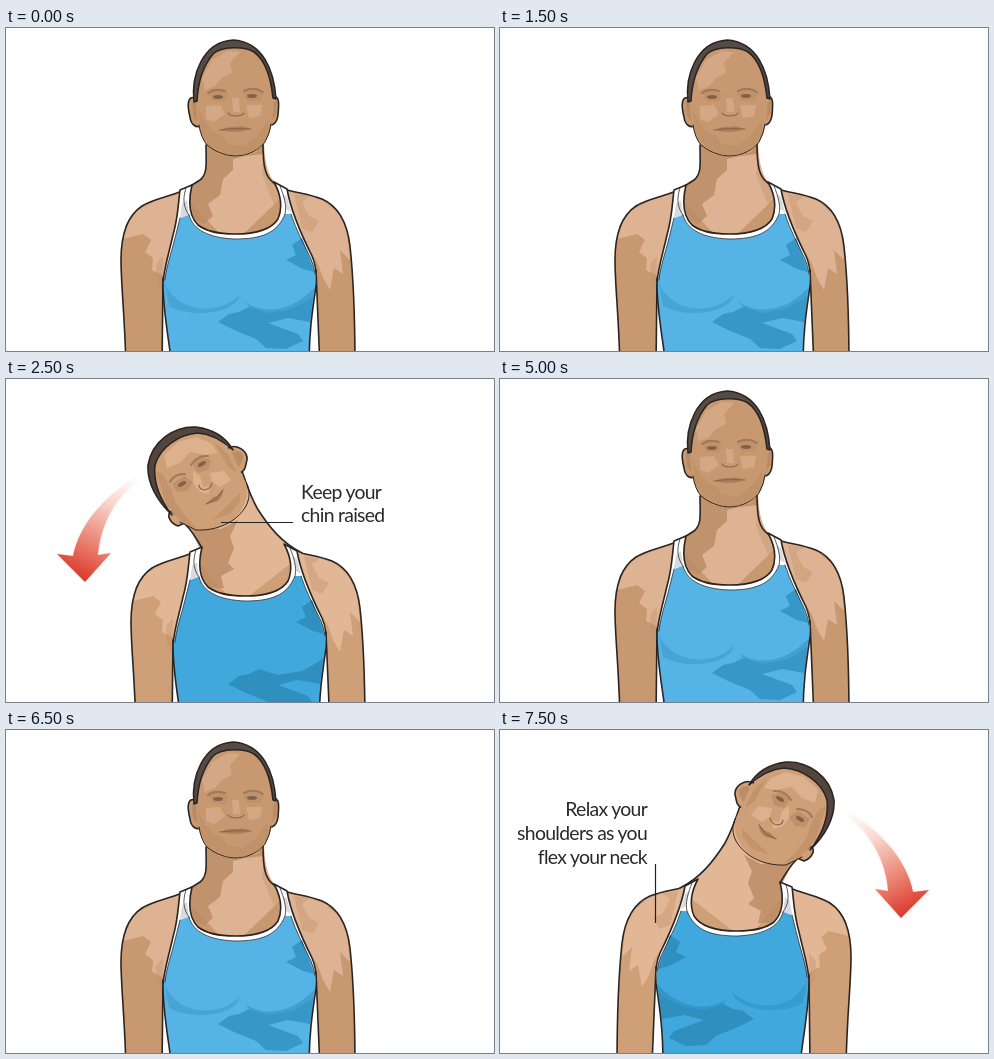
Recreate the animation shown at these times as an HTML page. Size 488 by 323 pixels, loop 10000 ms.

```html
<!DOCTYPE html>
<html lang="en">
<head>
<meta charset="utf-8">
<title>Neck stretch</title>
<style>
html, body { margin: 0; width: 100%; height: 100%; overflow: hidden; background: #fff; }
svg { display: block; width: 488px; height: 323px; }
.pose { --skin: #cf9f77; --shade: #bd8d65; --lit: #e2b796; --hair: #54443e; --top: #40a8dc; --fold: #2f90bf; --crease: #3398c9; }
.upright { --skin: #c89971; --shade: #b98b64; --lit: #deb393; --hair: #564a46; --top: #56b3e5; --fold: #3797c9; --crease: #449fd1; }
.left { --crease: var(--top); }
.skin { fill: var(--skin); }
.shade { fill: var(--shade); }
.lit { fill: var(--lit); }
.hair { fill: var(--hair); }
.top { fill: var(--top); }
.fold { fill: var(--fold); }
.crease { fill: var(--crease); }
.ink { stroke: #2b2522; stroke-width: 1.6; stroke-linejoin: round; stroke-linecap: round; }
.line { fill: none; }
.thin { stroke-width: 1; }
.fine { fill: none; stroke: #8a6549; stroke-width: 1.2; stroke-linecap: round; }
.brow { fill: none; stroke: #a0785a; stroke-width: 2; stroke-linecap: round; }
.eye { fill: #80614b; }
.lip { fill: #b17d5f; }
.pointer { stroke: #222; stroke-width: 1.2; }
text { font: 400 19.4px Lato, "Open Sans", sans-serif; letter-spacing: -.7px; fill: #2a2a2a; }
.upright { animation: upright 10s step-end infinite; }
.left { opacity: 0; animation: left 10s step-end infinite; }
.right { opacity: 0; animation: right 10s step-end infinite; }
@keyframes upright { 0%, 50% { opacity: 1; } 25%, 75%, 100% { opacity: 0; } }
@keyframes left { 0%, 50%, 100% { opacity: 0; } 25% { opacity: 1; } }
@keyframes right { 0% { opacity: 0; } 75%, 100% { opacity: 1; } }
</style>
</head>
<body>
<svg viewBox="0 0 488 323">
<defs>
  <linearGradient id="glow" gradientUnits="userSpaceOnUse" x1="130" y1="98" x2="76" y2="200">
    <stop offset="0" stop-color="#fff"/>
    <stop offset=".3" stop-color="#f9d6cd"/>
    <stop offset=".65" stop-color="#ec8b7a"/>
    <stop offset="1" stop-color="#dc3a2c"/>
  </linearGradient>
  <filter id="soft" x="-20%" y="-20%" width="140%" height="140%"><feGaussianBlur stdDeviation="1.5"/></filter>

  <g id="arrow">
    <path id="dart" d="M134 98C102 113 74 143 67 177L51 175L79 203L105 174L92 176C94 147 108 120 134 98Z" fill="#bb8b87" opacity=".25" filter="url(#soft)"/>
    <path d="M134 98C102 113 74 143 67 177L51 175L79 203L105 174L92 176C94 147 108 120 134 98Z" fill="url(#glow)"/>
  </g>

  <g id="arms">
    <path class="skin" d="M176 163C162 169 147 171 136 178C121 188 115 206 115 232C115 258 119 290 120 340H156L157 258L200 220H260L310 250L314 340H349C349 300 348 255 344 218C341 193 332 178 316 171C304 166 292 165 281 162L228 150Z"/>
    <path class="lit" d="M176 164L151 172L132 182L120 196L117 211L137 206L145 212L139 224L147 230L146 242L158 248L172 212L190 190Z"/>
    <path class="lit" d="M270 160L300 167L318 173L333 186L341 204L344 232L334 222L337 246L328 240L324 262L317 250L312 236L296 208Z"/>
    <path class="shade" d="M288 166L304 168L296 174L303 188L313 193L306 204L296 200ZM150 236L157 228L156 262L151 254Z" opacity=".35"/>
    <path class="ink line" d="M176 163C162 169 147 171 136 178C121 188 115 206 115 232C115 258 119 290 120 340M281 162C292 165 304 166 316 171C332 178 341 193 344 218C348 255 349 300 349 340M157 250L156 340M310 242L314 340"/>
  </g>

  <g id="shirt">
    <path fill="#fff" d="M174 162L186 157C182 174 183 188 192 197C201 204 215 206 229 206C250 206 265 202 272 191C277 179 274 165 268 154L281 161C285 184 295 206 306 228C310 237 311 245 310 258L300 270H165L157 255C158 240 163 225 167 207C172 190 172 178 174 162Z"/>
    <path fill="#d9dadd" d="M176 176L181 172L183 188L174 189ZM277 166L281 169L285 184L280 181Z"/>
    <path class="top" d="M174 190L183 187C187 202 203 210 229 211C254 211 271 206 279 186L285 186C290 202 298 216 305 231C309 240 310 250 309 262C306 285 303 305 303 340H166C163 310 158 285 157 258C160 240 165 226 169 210Z"/>
    <path class="fold" d="M296 210L302 226L308 244L297 241L280 232L290 227L286 217Z"/>
    <path class="crease" d="M158 252C164 272 184 283 208 280C222 277 230 271 234 266C232 284 190 292 163 278Z" opacity=".7"/>
    <path class="crease" d="M238 273C254 286 284 286 308 260L305 290L270 289L248 284Z"/>
    <path class="fold" d="M212 294L223 286L233 284L243 279L262 285L286 281L302 272L307 268L304 294L282 290L262 295L292 306L297 313L280 321L260 320L250 311L228 302Z"/>
    <path class="ink line thin" d="M183 187C187 202 203 210 229 211C254 211 271 206 279 186C281 178 278 168 274 158M180 160C176 172 178 180 183 187M174 190L169 210C165 226 160 240 159 252M285 186C290 202 298 216 305 231Q308 238 309 246" opacity=".75"/>
    <path class="ink line" d="M166 340C163 310 157 285 157 255C158 240 163 225 167 207C172 190 172 178 174 162L186 157C182 174 183 188 192 197C201 204 215 206 229 206C250 206 265 202 272 191C277 179 274 165 268 154L281 161C285 184 295 206 306 228C310 237 311 245 310 258C306 285 303 305 303 340"/>
  </g>

  <g id="tilted">
    <use href="#arms" x="10" y="11"/>
    <path class="lit" d="M178 143C187 152 193 163 197 169L186 174L230 227L297 175C276 164 263 148 251 129C244 116 240 104 236 92Z"/>
    <path class="shade" d="M182 146L215 150L232 141L224 157L228 169L222 184L228 190L215 197L218 209L203 209L194 198L195 172Z" opacity=".85"/>
    <path class="ink line" d="M179 145C187 153 192 162 196 169M236 92C240 104 244 116 251 129C263 148 276 164 296 174"/>
    <path class="skin ink" d="M222 69C232 64 242 73 241 81C239 88 240 91 234 94L225 90Z"/>
    <path class="shade" d="M226 73Q238 70 237 81L232 89L229 81Z"/>
    <path class="skin ink" d="M165 132C160 136 164 144 172 147L181 143Z"/>
    <path class="skin" d="M147 92C148 68 170 52 193 52C210 54 223 67 228 79L237 98C245 111 241 123 233 134C222 147 206 152 191 151C178 146 170 137 163 130C153 118 147 104 147 90Z"/>
    <path class="ink line thin" d="M174 143L190 151C210 152 230 144 240 127C244 119 244 112 241 105"/>
    <path class="hair ink" d="M166 136C151 122 141 104 142 86C146 62 168 47 190 48C206 50 219 57 227 71C217 62 206 55 192 54C174 55 154 68 149 86C147 104 155 122 166 136Z"/>
    <path class="lit" d="M158 76L172 63L190 58L205 64L212 74L200 76L184 73L174 84L161 89ZM187 92L194 97L197 108L204 107L203 115L194 113L187 104ZM204 94L218 92L225 101L214 108L206 103Z" opacity=".75"/>
    <path class="shade" d="M150 93L157 95L166 112L169 123L181 139L192 150L178 145L161 127ZM209 64L222 75L231 94L222 88ZM222 126L234 114L234 122L224 135L206 141Z" opacity=".6"/>
    <path class="shade" d="M166 105L178 97L187 103L181 112L171 113ZM186 85L195 78L205 81L202 91L192 94Z" opacity=".8"/>
    <path class="brow" d="M164 103Q168 95 179 95M185 86Q191 76 202 77"/>
    <ellipse class="eye" cx="176" cy="105" rx="4.5" ry="1.9" transform="rotate(-30 176 105)"/>
    <ellipse class="eye" cx="196" cy="85" rx="4.5" ry="1.9" transform="rotate(-30 196 85)"/>
    <path class="fine" d="M193 106Q193 110 198 111Q205 110 206 104"/>
    <path class="lip" d="M200 125L207 118L211 117L217 111Q217 119 210 123Z"/>
    <path class="fine" d="M200 125L210 120L217 111"/>
    <use href="#shirt" x="10" y="11"/>
  </g>
</defs>

<g class="pose upright">
  <use href="#arms"/>
  <path class="lit" d="M200 110C200 132 202 145 194 152L175 164L225 218L282 163C268 156 259 150 258 112Z"/>
  <path class="shade" d="M200 116L214 126L232 129L250 124L257 117L258 126L240 128L227 131L227 142L217 151L214 167L202 176L207 188L198 196L187 190L182 178L184 160L200 146Z" opacity=".8"/>
  <path class="skin" d="M258 128L260 145L269 157L275 178L268 176L262 162L256 146Z" opacity=".5"/>
  <path class="ink line" d="M200 117C200 135 202 146 194 152L175 164M257 115C257 138 259 149 268 155L281 162"/>
  <path class="skin ink" d="M190 70C181 67 181 77 184 89C185 97 190 100 195 98Z"/>
  <path class="skin ink" d="M266 69C274 66 273 77 272 87C271 95 267 98 262 97Z"/>
  <path class="shade" d="M186 74L191 76L192 94L187 88ZM268 74L271 73L270 86L266 92Z"/>
  <path class="skin" d="M190 70C190 40 204 17 228 17C253 17 267 40 267 70C268 86 266 105 259 114C252 123 242 128 230 128C216 127 203 121 198 113C192 103 190 85 190 70Z"/>
  <path class="ink line thin" d="M193 97Q195 110 201 117C211 125 221 128 231 128C243 127 253 122 259 114Q264 105 265 96"/>
  <path class="hair ink" d="M188 74C185 48 196 14 227 12C257 14 268 42 270 71L267 70C265 50 259 32 248 24C238 18 216 18 207 26C197 38 192 53 191 73Z"/>
  <path class="lit" d="M206 32L222 23L234 24L224 35L226 45L216 50L209 58L199 62L196 50ZM200 78L214 77L219 86L208 94L200 91ZM240 77L256 77L254 88L243 90ZM226 70L233 70L234 84L227 84Z" opacity=".6"/>
  <path class="shade" d="M192 80L199 94L207 104L217 108L222 116L238 118L250 108L262 92L262 105L254 120L238 127L222 127L204 118L195 104ZM202 64L214 61L222 66L219 74L206 73ZM237 65L248 60L258 65L254 73L241 73Z" opacity=".5"/>
  <path class="brow" d="M202 65Q208 60 219 63M238 63Q248 58 257 64"/>
  <ellipse class="eye" cx="212" cy="69" rx="5" ry="1.9"/>
  <ellipse class="eye" cx="246" cy="68" rx="5" ry="1.9"/>
  <path class="fine" d="M222 85Q224 88 230 88Q236 88 238 85"/>
  <path class="lip" d="M215 102Q222 98 230 99Q238 97 244 101Q238 104 229 104Q220 104 215 102Z"/>
  <path class="fine" d="M214 102Q230 100 245 101"/>
  <use href="#shirt"/>
</g>

<g class="pose left">
  <use href="#arrow"/>
  <use href="#tilted"/>
  <path class="pointer" d="M215 143.5H287"/>
  <text x="295" y="120">Keep your</text>
  <text x="295" y="143">chin raised</text>
</g>

<g class="pose right">
  <use href="#arrow" transform="translate(480 -15) scale(-1 1)"/>
  <use href="#tilted" transform="translate(476 -16) scale(-1 1)"/>
  <path class="pointer" d="M155.5 134V193"/>
  <g text-anchor="end">
    <text x="147" y="86">Relax your</text>
    <text x="147" y="110">shoulders as you</text>
    <text x="147" y="134">flex your neck</text>
  </g>
</g>
</svg>
</body>
</html>
```
